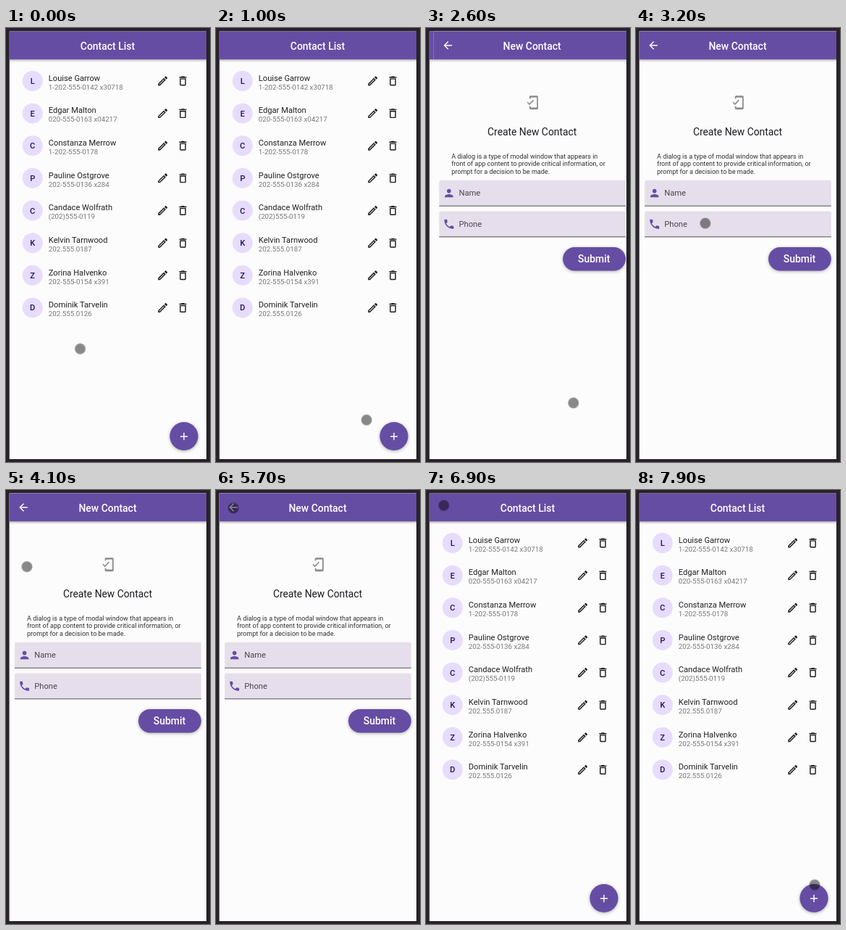
An HTML page for the animation above (8000 ms loop, 282x598 px).

```html
<!DOCTYPE html>
<html lang="en">
<head>
<meta charset="utf-8">
<title>Contact list</title>
<style>
  html, body { margin: 0; width: 100%; height: 100%; overflow: hidden; background: #272329; }
  svg { display: block; width: 100vw; height: 100vh; font-family: Roboto, sans-serif; }
  .title { font-size: 13.94px; font-weight: 500; fill: #fff; text-anchor: middle; }
  .name { font-size: 11.15px; fill: #202024; }
  .phone { font-size: 9.76px; fill: #77757a; }
  .initial { font-size: 11.15px; font-weight: 500; fill: #21135d; text-anchor: middle; }
  .heading { font-size: 13.85px; fill: #1d1b20; text-anchor: middle; }
  .body { font-size: 9.06px; fill: #302e33; }
  .label { font-size: 11.15px; fill: #49454f; }
  .raised { filter: drop-shadow(0 1.5px 2px rgba(0, 0, 0, .32)); }
</style>
</head>
<body>
<svg id="stage" viewBox="0 0 282 598">
  <defs>
    <clipPath id="screen"><rect x="4.5" y="4.5" width="272.5" height="589.5"/></clipPath>
    <linearGradient id="shade" x2="0" y2="1">
      <stop stop-color="#000" stop-opacity=".24"/>
      <stop offset="1" stop-color="#000" stop-opacity="0"/>
    </linearGradient>
    <radialGradient id="dot">
      <stop offset=".72" stop-opacity=".46"/>
      <stop offset=".86" stop-opacity=".38"/>
      <stop offset="1" stop-opacity=".08"/>
    </radialGradient>
  </defs>
  <g clip-path="url(#screen)">
    <g id="list"></g>
    <g id="form"></g>
    <circle id="cursor" r="8" fill="url(#dot)"/>
  </g>
</svg>
<script>
const LOOP = 8000, WIDTH = 272.5, PURPLE = '#664da4';

const ICONS = {
  edit: 'M14.06 9.02l.92.92L5.92 19H5v-.92l9.06-9.06M17.66 3c-.25 0-.51.1-.7.29l-1.83 1.83 3.75 3.75 1.83-1.83c.39-.39.39-1.02 0-1.41l-2.34-2.34c-.2-.2-.45-.29-.71-.29zm-3.6 3.19L3 17.25V21h3.75L17.81 9.94l-3.75-3.75z',
  trash: 'M6 19c0 1.1.9 2 2 2h8c1.1 0 2-.9 2-2V7H6v12zM8 9h8v10H8V9zm7.5-5l-1-1h-5l-1 1H5v2h14V4z',
  back: 'M20 11H7.83l5.59-5.59L12 4l-8 8 8 8 1.41-1.41L7.83 13H20v-2z',
  person: 'M12 12c2.21 0 4-1.79 4-4s-1.79-4-4-4-4 1.79-4 4 1.79 4 4 4zm0 2c-2.67 0-8 1.34-8 4v2h16v-2c0-2.66-5.33-4-8-4z',
  call: 'M6.62 10.79c1.44 2.83 3.76 5.14 6.59 6.59l2.2-2.2c.27-.27.67-.36 1.02-.24 1.12.37 2.33.57 3.57.57.55 0 1 .45 1 1V20c0 .55-.45 1-1 1-9.39 0-17-7.61-17-17 0-.55.45-1 1-1h3.5c.55 0 1 .45 1 1 0 1.25.2 2.45.57 3.57.11.35.03.74-.25 1.02l-2.2 2.2z',
  device: 'M19 1H9c-1.1 0-2 .9-2 2v3h2V4h10v16H9v-2H7v3c0 1.1.9 2 2 2h10c1.1 0 2-.9 2-2V3c0-1.1-.9-2-2-2zM7.01 13.47l-2.55-2.55-1.27 1.27L7 16l7.19-7.19-1.27-1.27z',
  plus: 'M19 13h-6v6h-2v-6H5v-2h6V5h2v6h6v2z'
};

const CONTACTS = [
  ['Louise Garrow', '1-202-555-0142 x30718'],
  ['Edgar Malton', '020-555-0163 x04217'],
  ['Constanza Merrow', '1-202-555-0178'],
  ['Pauline Ostgrove', '202-555-0136 x284'],
  ['Candace Wolfrath', '(202)555-0119'],
  ['Kelvin Tarnwood', '202.555.0187'],
  ['Zorina Halvenko', '202-555-0154 x391'],
  ['Dominik Tarvelin', '202.555.0126']
];

// Pointer stops: time, x, y
const PATH = [
  [0, 102.5, 442], [100, 109, 446], [200, 116, 448], [400, 116, 449],
  [700, 150, 482], [1000, 208, 540], [1200, 232, 560], [1600, 232, 560],
  [2000, 237, 558], [2300, 236, 557], [2600, 204, 517], [2900, 150, 400],
  [3300, 78, 226], [3700, 50, 160], [4100, 29, 106], [4200, 25, 73],
  [4600, 24, 25], [6100, 24, 25], [6500, 24, 31], [6900, 24.5, 21],
  [7100, 50, 75], [7400, 142, 305], [7700, 238, 522], [7800, 247, 544]
];

const text = (cls, x, y, str) => `<text class="${cls}" x="${x}" y="${y}">${str}</text>`;

const icon = (name, x, y, fill, scale = .72) =>
  `<path d="${ICONS[name]}" fill="${fill}" transform="translate(${x} ${y}) scale(${scale}) translate(-12 -12)"/>`;

const page = title => `
  <rect x="4.5" y="4" width="${WIDTH}" height="590" fill="#fcfcfc"/>
  <rect x="4.5" y="43" width="${WIDTH}" height="4.5" fill="url(#shade)"/>
  <rect x="4.5" y="4" width="${WIDTH}" height="39.3" fill="${PURPLE}"/>
  ${text('title', 140.5, 29.7, title)}`;

function row([name, phone], i) {
  const y = 73 + i * 44.63;
  return `<circle cx="36.7" cy="${y}" r="14" fill="#e7dcfd"/>
    ${text('initial', 36.7, y + 4, name[0])}
    ${text('name', 58.8, y - .2, name)}
    ${text('phone', 58.8, y + 11.8, phone)}
    ${icon('edit', 216.7, y, '#1c1b1f')}
    ${icon('trash', 244.5, y, '#1c1b1f')}`;
}

const field = (y, glyph, label) => `
  <path d="M12 ${y + 35.5}V${y + 2.8}q0-2.8 2.8-2.8H267q2.8 0 2.8 2.8V${y + 35.5}z" fill="#e6dfeb"/>
  <rect x="12" y="${y + 34.9}" width="257.8" height="1" fill="#545058"/>
  ${icon(glyph, 25.6, y + 17.8, PURPLE)}
  ${text('label', 39.3, y + 21.3, label)}`;

const $ = id => document.getElementById(id);

$('list').innerHTML = page('Contact List') + CONTACTS.map(row).join('') +
  `<circle class="raised" cx="246" cy="562.5" r="19.6" fill="${PURPLE}"/>` +
  icon('plus', 246, 562.7, '#fff');

$('form').innerHTML = page('New Contact') +
  icon('back', 24, 24, '#fff') +
  icon('device', 141, 102.7, '#8b898d', .86) +
  text('heading', 140.5, 147.6, 'Create New Contact') +
  ['A dialog is a type of modal window that appears in',
   'front of app content to provide critical information, or',
   'prompt for a decision to be made.']
    .map((line, i) => text('body', 29, 179.6 + i * 10.6, line)).join('') +
  field(209.8, 'person', 'Name') + field(252.4, 'call', 'Phone') +
  `<rect class="raised" x="183" y="302" width="86.8" height="32.5" rx="16.25" fill="${PURPLE}"/>` +
  text('title', 226, 323.3, 'Submit');

const progress = (t, start, length) => Math.min(1, Math.max(0, (t - start) / length));

function pointerAt(t) {
  const i = PATH.findIndex(p => p[0] > t);
  if (i < 0) return PATH[PATH.length - 1].slice(1);
  const [a, b] = [PATH[i - 1], PATH[i]];
  const k = progress(t, a[0], b[0] - a[0]);
  return [1, 2].map(n => a[n] + (b[n] - a[n]) * k);
}

function draw(t) {
  const enter = progress(t, 2240, 425), leave = progress(t, 6500, 380);
  const shift = WIDTH * ((1 - enter) ** 2 + leave ** 2);
  $('form').setAttribute('transform', `translate(${shift.toFixed(2)} 0)`);
  $('form').style.display = shift < WIDTH ? '' : 'none';
  const [x, y] = pointerAt(t);
  $('cursor').setAttribute('cx', x);
  $('cursor').setAttribute('cy', y);
}

const origin = performance.now();
function tick() {
  draw((performance.now() - origin) % LOOP);
  requestAnimationFrame(tick);
}
tick();
</script>
</body>
</html>
```
